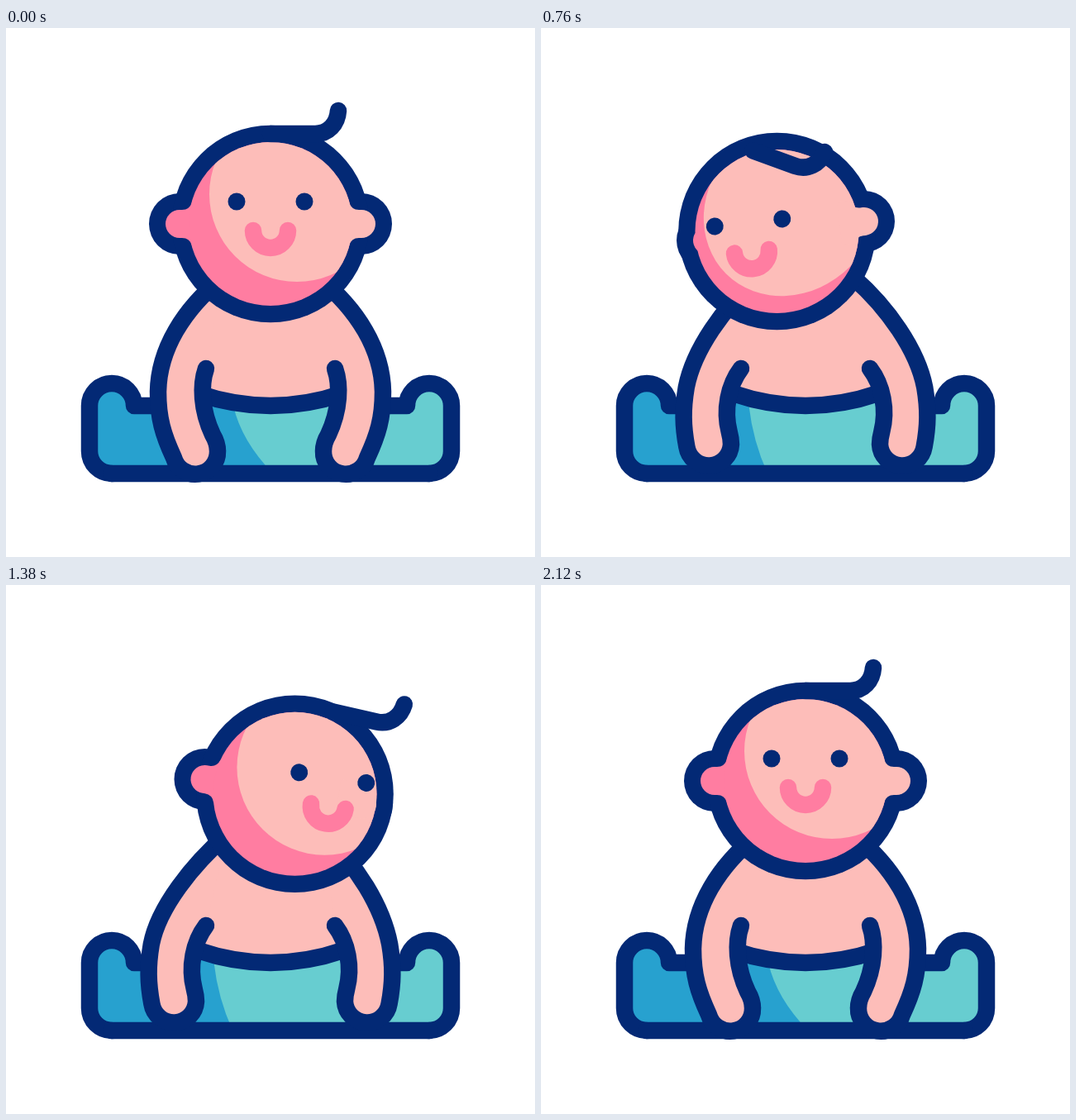
These frames come from a looping animation (640 by 640 pixels, 2.4 s). An HTML page with a canvas:

```html
<!DOCTYPE html>
<html>
<head>
<meta charset="utf-8">
<title>Baby looking around</title>
<style>
html, body { margin: 0; height: 100%; overflow: hidden; background: #fff; }
canvas { display: block; width: 640px; height: 640px; }
</style>
</head>
<body>
<canvas id="stage" width="640" height="640"></canvas>
<script>
const ctx = document.getElementById('stage').getContext('2d');
const NAVY = '#032975', SKIN = '#fdbdb9', PINK = '#ff7da1', BLUE = '#27a1cf', TEAL = '#67cdd0';
const LOOP = 2400, CX = 320, CY = 237;

// head x,y | face x,y,angle | hair x,y,angle | left ear x,y | right ear x,y | light x,y,stretch
const FRONT = [0, 0, 0, -27, 0, 0, -109, 0, -110, 0, 110, 0, 32, -36, 0];
const LEFT = [-32, 6.5, -36, -13, -6.3, -32.6, -101.7, 18, -89, 11, 108, -12.5, 18, -29, 6];
const LOW_LEFT = [-34.5, 9, -34.5, -10.5, -6.3, -29, -97.7, 20, -84.5, 11, 105.5, -12, 17.5, -28, 6];
const RIGHT = [30, 16, 46.5, -19.5, 9, 47, -99, 13, -109, -18, 81, 13, 36, -32, 0];
const headKeys = [[0, FRONT], [360, LEFT], [760, LOW_LEFT], [1120, RIGHT], [1350, RIGHT], [1755, FRONT]];
const armKeys = [[0, [0]], [540, [1]], [1080, [0]], [1590, [1]], [2120, [0]]];

const lerp = (a, b, p) => a + (b - a) * p;

function track(keys, t) {
  const next = keys.findIndex(k => k[0] > t);
  if (next < 0) return keys[keys.length - 1][1];
  const [t0, from] = keys[next - 1], [t1, to] = keys[next];
  const u = (t - t0) / (t1 - t0), p = u * u * (3 - 2 * u);
  return from.map((v, i) => lerp(v, to[i], p));
}

function fill(d, color) {
  ctx.fillStyle = color;
  ctx.fill(new Path2D(d));
}

function stroke(d, color = NAVY) {
  ctx.strokeStyle = color;
  ctx.stroke(new Path2D(d));
}

// A stretched disc grows along its rising diagonal.
function disc(x, y, r, color, stretch = 0) {
  ctx.fillStyle = color;
  ctx.beginPath();
  ctx.ellipse(x, y, r + stretch, r - stretch, -Math.PI / 4, 0, Math.PI * 2);
  ctx.fill();
}

function at(x, y, degrees, draw) {
  ctx.save();
  ctx.translate(x, y);
  ctx.rotate(degrees * Math.PI / 180);
  draw();
  ctx.restore();
}

function mirrored(draw) {
  ctx.save();
  ctx.translate(640, 0);
  ctx.scale(-1, 1);
  draw();
  ctx.restore();
}

function legs(a) {
  const foot = 'M128 539A27 27 0 0 1 101 512V457A27 27 0 0 1 155 457';
  const waist = 'H205L225 435';
  fill(foot + waist + 'H415L435 457H485A27 27 0 0 1 539 457V512A27 27 0 0 1 512 539Z', TEAL);
  fill(`${foot}${waist}H${270 - 34 * a}L${275 - 37 * a} 457Q${285 - 45 * a} 500 ${323 - 77 * a} 539Z`, BLUE);
  stroke(foot + 'H190');
  mirrored(() => stroke(foot + 'H190'));
  stroke('M128 539H512');
}

function torso() {
  fill('M262 302L215 380L242 412L230 442Q320 472 410 442L398 412L425 380L378 302Z', SKIN);
  ctx.lineCap = 'butt';
  stroke('M232 442Q320 472 408 442');
  ctx.lineCap = 'round';
}

function arm(a, lean) {
  const pt = (x0, y0, x1, y1, dx = 0) => `${lerp(x0, x1, a) + dx} ${lerp(y0, y1, a)} `;
  const d = 'M' + pt(262, 302, 262, 302, lean)
    + 'C' + pt(214, 341, 225, 336, lean) + pt(185, 389, 184, 390) + pt(184, 440, 171, 432)
    + 'C' + pt(184, 472, 164, 455) + pt(190, 492, 161, 475) + pt(203, 520, 161, 499)
    + 'A27 27 0 0 0 ' + pt(256, 512, 215, 499)
    + 'Q' + pt(256, 502, 215, 494) + pt(250, 492, 215, 487)
    + 'C' + pt(236, 462, 212, 462) + pt(235, 432, 222, 432) + '242 412';
  fill(d, SKIN);
  stroke(d);
}

function ear(x, y, color) {
  at(x, y, Math.atan2(-y, -x) * 180 / Math.PI, () =>
    fill('M0 -17H3Q12 -17 15 -26H30V26H15Q12 17 3 17H0A17 17 0 0 1 0 -17Z', color));
}

function head([x, y, fx, fy, fa, hx, hy, ha, lx, ly, rx, ry, sx, sy, stretch]) {
  at(CX + x, CY + y, 0, () => {
    disc(lx, ly, 37, NAVY);
    disc(rx, ry, 37, NAVY);
    disc(0, 0, 119.3, NAVY);
    ear(lx, ly, PINK);
    disc(0, 0, 99, PINK);
    ctx.save();
    ctx.beginPath();
    ctx.arc(0, 0, 99, 0, Math.PI * 2);
    ctx.clip();
    disc(sx, sy, 106, SKIN, stretch);
    ctx.restore();
    ear(rx, ry, SKIN);
    at(hx, hy, ha, () => stroke('M0 0H54C70 0 81 -12 82 -28'));
    at(fx, fy, fa, () => {
      disc(-41, 0, 10.5, NAVY);
      disc(41, 0, 10.5, NAVY);
      stroke('M-21 35A21 21 0 0 0 21 35', PINK);
    });
  });
}

function frame(now) {
  const t = now % LOOP;
  const pose = track(headKeys, t), [a] = track(armKeys, t);
  const lean = Math.max(0, pose[0]) * 0.18;
  ctx.fillStyle = '#fff';
  ctx.fillRect(0, 0, 640, 640);
  ctx.lineWidth = 20.5;
  ctx.lineCap = ctx.lineJoin = 'round';
  legs(a);
  torso();
  arm(a, lean);
  mirrored(() => arm(a, -lean));
  head(pose);
}

const start = performance.now();
function loop() {
  frame(performance.now() - start);
  requestAnimationFrame(loop);
}
loop();
</script>
</body>
</html>
```
